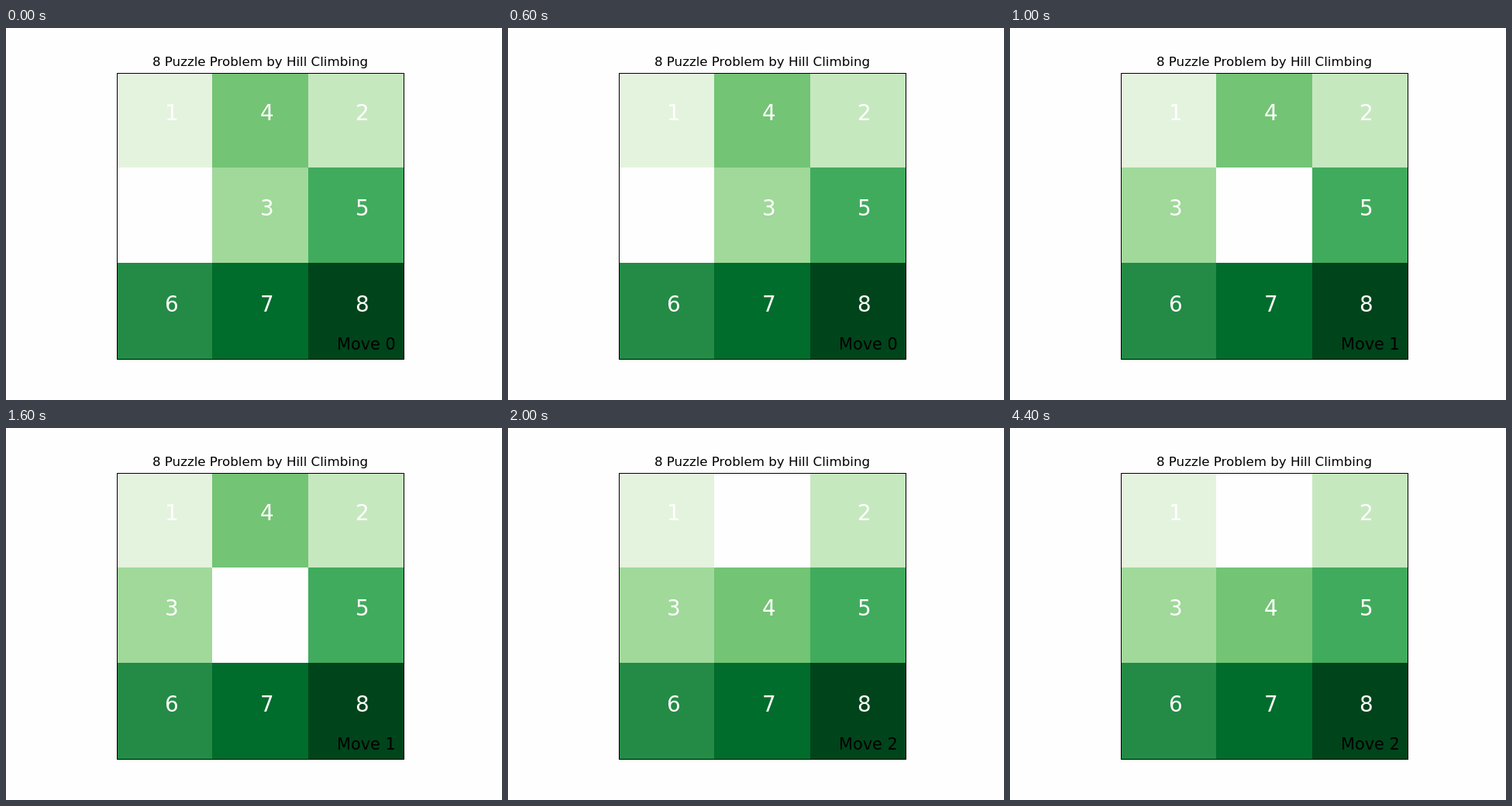
Animation, 640 px wide and 480 px high, one loop 6000 ms. Source, as an HTML page with a canvas:

```html
<!DOCTYPE html>
<html lang="en">
<head>
<meta charset="utf-8">
<title>8 Puzzle</title>
<style>
  html, body { margin: 0; height: 100%; overflow: hidden; background: #fefefe; }
  canvas { display: block; }
</style>
</head>
<body>
<canvas id="stage" width="640" height="480"></canvas>
<script>
const ctx = document.getElementById('stage').getContext('2d');
const LOOP = 6000, STEP = 1000;
const BOARDS = ['142035678', '142305678', '102345678'];
const COLORS = ['#fefefe', '#e4f3de', '#c6e8bf', '#a0d99a', '#73c475',
                '#41ab5d', '#238b45', '#006d2c', '#00441b'];
const COLS = [143, 266, 390, 514], ROWS = [58, 180, 303, 428];
const TEXT_X = [205, 328, 451], BASELINES = [119, 242, 366];

function label(text, x, y, size, color, align) {
  ctx.font = `${size}px "DejaVu Sans", sans-serif`;
  ctx.fillStyle = color;
  ctx.textAlign = align;
  ctx.fillText(text, x, y);
}

function draw(move) {
  ctx.fillStyle = '#fefefe';
  ctx.fillRect(0, 0, 640, 480);
  [...BOARDS[move]].forEach((digit, i) => {
    const c = i % 3, r = Math.floor(i / 3);
    ctx.fillStyle = COLORS[digit];
    ctx.fillRect(COLS[c], ROWS[r], COLS[c + 1] - COLS[c], ROWS[r + 1] - ROWS[r]);
    if (digit !== '0') label(digit, TEXT_X[c], BASELINES[r], 27.78, '#fefefe', 'left');
  });
  ctx.strokeStyle = '#000';
  ctx.strokeRect(143.5, 58.5, 370, 369);
  label('8 Puzzle Problem by Hill Climbing', 328, 49, 16.67, '#000', 'center');
  label('Move ' + move, 502.7, 415, 20.83, '#000', 'right');
}

function tick() {
  const t = performance.now() % LOOP;
  draw(Math.min(Math.floor(t / STEP), BOARDS.length - 1));
  requestAnimationFrame(tick);
}
tick();
</script>
</body>
</html>
```
